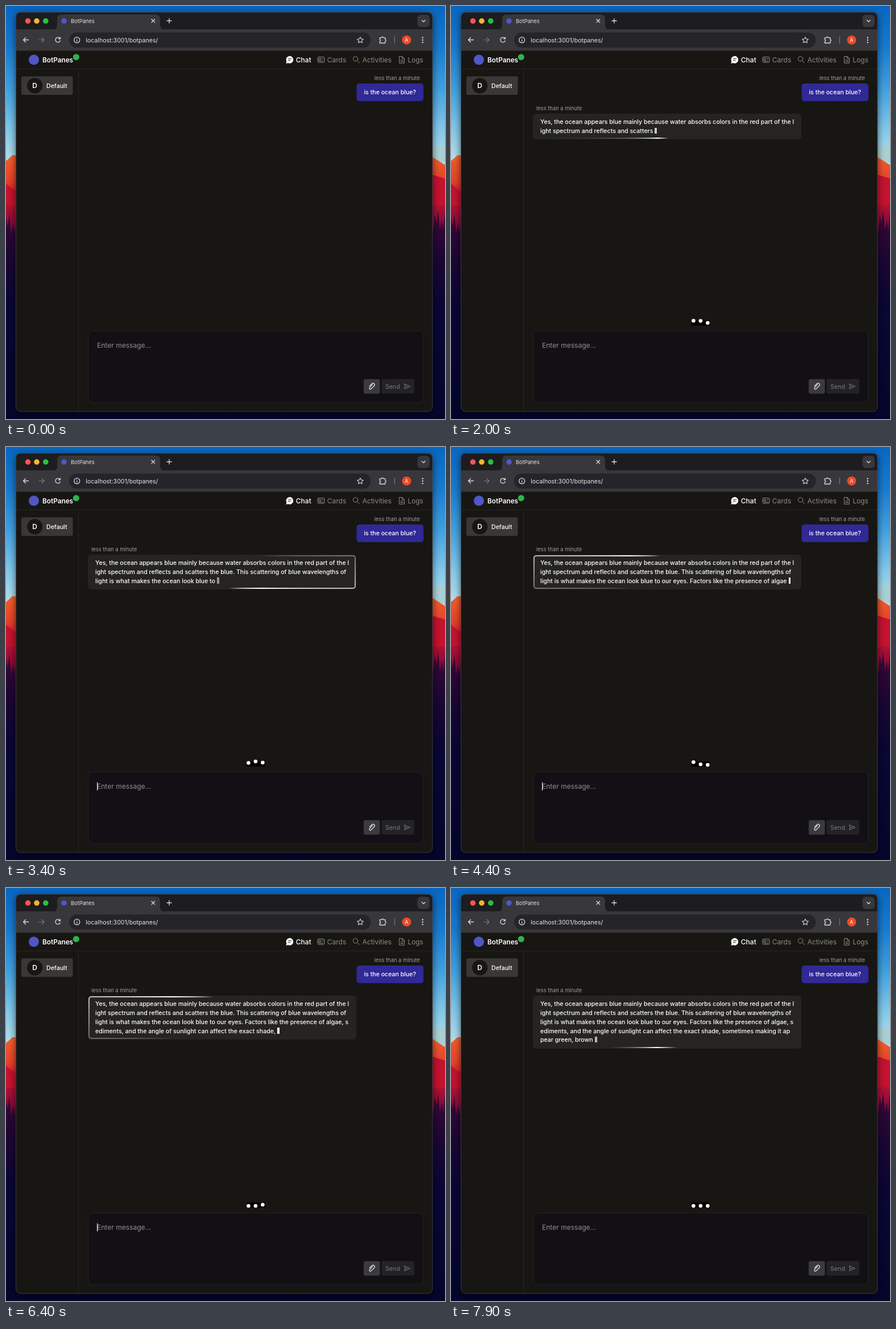
Animation, 772 px wide and 725 px high, one loop 8000 ms. Source, as an HTML page:

```html
<!DOCTYPE html>
<html lang="en">
<head>
<meta charset="utf-8">
<title>Chat stream</title>
<style>
  html, body { margin: 0; width: 100%; height: 100%; overflow: hidden; background: #04062c; }
  body { position: relative; font-family: Inter, "Open Sans", sans-serif; }
  svg { position: absolute; left: 0; top: 0; display: block; }
  svg text { font-family: Inter, "Open Sans", sans-serif; white-space: pre; }
  .line { fill: none; stroke-linecap: round; stroke-linejoin: round; }
  #bubble {
    position: absolute; left: 144px; top: 189px; box-sizing: border-box;
    border-radius: 6px; padding: 7.4px 13px 6.6px; background: #252422;
    color: #fff; font-size: 10.59px; font-weight: 500; line-height: 15.75px; white-space: pre;
  }
  /* Ring lit by a rotating wedge of light */
  #bubble::before {
    content: ""; position: absolute; inset: 1px; border: 2px solid transparent; border-radius: 5px;
    background:
      linear-gradient(#252422, #252422) padding-box,
      conic-gradient(from var(--from), transparent 0deg, #fff 45deg, transparent 90deg) border-box;
  }
  #bubble div { position: relative; height: 15.75px; }
  #block {
    display: inline-block; width: 3.8px; height: 10.5px; margin-left: 3px;
    background: #fff; vertical-align: -1px; line-height: 0;
  }
</style>
</head>
<body>
<svg width="772" height="725" viewBox="0 0 772 725">
  <defs>
    <linearGradient id="sky" x2="0" y2="1">
      <stop offset="0" stop-color="#0866c0"/>
      <stop offset=".1" stop-color="#187ace"/>
      <stop offset=".2" stop-color="#419fde"/>
      <stop offset=".3" stop-color="#84c8e8"/>
      <stop offset=".37" stop-color="#b0dcea"/>
    </linearGradient>
    <linearGradient id="hills" gradientUnits="userSpaceOnUse" x1="0" y1="262" x2="0" y2="725">
      <stop offset="0" stop-color="#f0602c"/>
      <stop offset=".1" stop-color="#e4402a"/>
      <stop offset=".15" stop-color="#c8142f"/>
      <stop offset=".25" stop-color="#8e0c38"/>
      <stop offset=".36" stop-color="#4a0a3c"/>
      <stop offset=".5" stop-color="#0b0738"/>
      <stop offset="1" stop-color="#04062c"/>
    </linearGradient>
    <linearGradient id="forest" x2="0" y2="1">
      <stop offset="0" stop-color="#3a0836"/>
      <stop offset=".5" stop-color="#1a0634"/>
      <stop offset="1" stop-color="#070634"/>
    </linearGradient>
    <filter id="soft" x="-5%" y="-5%" width="110%" height="110%"><feGaussianBlur stdDeviation="6"/></filter>
    <clipPath id="frame"><rect x="17.5" y="11" width="732.5" height="701" rx="8"/></clipPath>
  </defs>

  <!-- wallpaper -->
  <rect width="772" height="725" fill="url(#sky)"/>
  <rect x="745" y="244" width="27" height="30" fill="#a9cfd2"/>
  <path d="M0 272L6 267L11 262H17L24 270H745L750 265L772 279V725H0Z" fill="url(#hills)"/>
  <path d="M0 312L17 326V350H0ZM750 296L772 303V350H750Z" fill="#c4122f"/>
  <path id="trees" fill="url(#forest)"/>
  <rect x="16" y="13" width="735.5" height="704" rx="10" fill="#000" opacity=".5" filter="url(#soft)"/>

  <!-- browser window -->
  <g clip-path="url(#frame)">
    <rect x="17" y="11" width="734" height="702" fill="#181613"/>
    <rect x="17" y="11" width="734" height="31" fill="#1d1c1f"/>
    <rect x="17" y="41" width="734" height="37" fill="#38373b"/>
    <path d="M82 41.5Q90 41.5 90 33.500V23Q90 15 98 15H263Q271 15 271 23V33.500Q271 41.5 279 41.5Z" fill="#38373b"/>
    <path d="M17 78.500H751M17 110.500H751M127.500 110V713" stroke="#282622" fill="none"/>
  </g>
  <rect x="17.500" y="11" width="732.500" height="701" rx="8" fill="none" stroke="#55545a" opacity=".6"/>
  <circle cx="38.500" cy="26.300" r="4.800" fill="#f4574e"/>
  <circle cx="54" cy="26.300" r="4.800" fill="#f6b42f"/>
  <circle cx="69.800" cy="26.300" r="4.800" fill="#28c03f"/>
  <circle cx="102" cy="26.300" r="4.800" fill="#4f57c6"/>
  <rect x="723.500" y="15.500" width="21.500" height="21.500" rx="6" fill="#38373b"/>
  <rect x="111" y="46.500" width="530.500" height="26.500" rx="13.200" fill="#252428"/>
  <g class="line" stroke="#dddce0" stroke-width="1.300">
    <path d="M256 23.300l5.600 5.600m0-5.600l-5.600 5.600M283 26h8m-4-4v8M731.500 25l2.800 2.800 2.800-2.800"/>
    <path d="M39.500 59.500h-9m4-4l-4 4 4 4M95 57.300a4.300 4.300 0 1 0 .3 3.500M95.400 54.800v2.900h-2.900"/>
    <circle cx="124.700" cy="59.700" r="5"/><path d="M124.700 59.500v2.500m0-4.700v.1"/>
    <path d="M623 54.500l1.600 3.300 3.700.5-2.700 2.500.7 3.600-3.300-1.700-3.300 1.700.7-3.600-2.700-2.500 3.700-.5z" stroke-width="1.100"/>
    <path d="M657.300 55.700h3.200a1.500 1.500 0 0 1 3 0h3.300v3.100a1.500 1.500 0 0 1 0 3v3.200h-9.500v-3.100a1.500 1.500 0 0 0 0-3z"/>
  </g>
  <path d="M58 59.500h9m-4-4l4 4-4 4M683.500 54v11" class="line" stroke="#78777b" stroke-width="1.200"/>
  <circle cx="704.500" cy="59.700" r="8" fill="#ec4a2a"/>
  <g fill="#e4e4e6"><circle cx="732.700" cy="55.500" r="1.200"/><circle cx="732.700" cy="59.700" r="1.200"/><circle cx="732.700" cy="63.900" r="1.200"/></g>

  <!-- app header -->
  <circle cx="49" cy="94.300" r="9" fill="#4f57c6"/>
  <circle cx="123.300" cy="89.700" r="5.500" fill="#2bb64c"/>
  <path d="M492.500 101l.8-3.600a6.400 6.400 0 1 1 2.700 2.600z" fill="#fff"/>
  <path d="M496.500 92.700h5.200m-5.200 3h3.500" class="line" stroke="#181613" stroke-width="1.100"/>
  <g class="line" stroke="#8d8c8a">
    <rect x="548" y="89.500" width="12" height="9.500" rx="1.800"/>
    <path d="M550.300 92h3v3h-3zM555.500 92.500h2.500m-7.700 4.300h7.700"/>
    <circle cx="614.700" cy="92.700" r="4.100"/><path d="M617.700 95.800l3.600 3.800"/>
    <path d="M692 88.500h4.800l3.700 3.700v8h-8.500zM696.700 88.700v3.500h3.500M694 95h4.500m-4.500 2.500h4.500"/>
  </g>

  <!-- sidebar, messages, composer -->
  <rect x="27.500" y="124" width="89.500" height="31.500" rx="2" fill="#393835" stroke="#45443f" stroke-width=".6"/>
  <circle cx="50.700" cy="139.800" r="13.600" fill="#171614"/>
  <rect x="616.500" y="136" width="117.700" height="31" rx="5" fill="#302996"/>
  <rect x="144.500" y="570.500" width="589" height="125.500" rx="8" fill="#121014" stroke="#232126"/>
  <rect x="629" y="655" width="28.500" height="25.500" rx="3" fill="#3b3a3d"/>
  <rect x="660.500" y="655" width="57.500" height="25.500" rx="3" fill="#232224"/>
  <path d="M639.300 667.200l4.200-4.200a2.700 2.700 0 0 1 3.900 3.900l-5.300 5.300a1.800 1.800 0 0 1-2.600-2.600l4.900-4.900" class="line" stroke="#f2f2f2" stroke-width="1.200"/>
  <path d="M700.500 663.500l10.300 4.300-10.300 4.300 1.500-4.300zM702 667.800h4" class="line" stroke="#7a797c"/>
  <g id="labels"></g>
  <rect id="caret" x="160" y="588.500" width="1.200" height="14.500" fill="#e8e8e8"/>
  <g id="dots">
    <rect x="423" y="552" width="32.500" height="9" fill="#000"/>
    <circle cx="426.400" r="3.300" fill="#fff"/>
    <circle cx="438.900" r="3.300" fill="#fff"/>
    <circle cx="451.400" r="3.300" fill="#fff"/>
  </g>
</svg>
<div id="bubble"></div>

<script>
const LOOP = 8000, STEP = 100;
const DOTS_AT = 200, REPLY_AT = 500;
const $ = id => document.getElementById(id);

function label(x, y, text, size, fill, weight = 400, anchor = 'start') {
  const node = document.createElementNS('http://www.w3.org/2000/svg', 'text');
  const attrs = { x, y, fill, 'font-size': size, 'font-weight': weight, 'text-anchor': anchor };
  for (const key in attrs) node.setAttribute(key, attrs[key]);
  node.textContent = text;
  $('labels').append(node);
  return node;
}

label(114, 29.6, 'BotPanes', 9.3, '#e4e3e6');
label(140.3, 63.5, 'localhost:3001/botpanes/', 10.6, '#e6e5e8');
label(704.5, 62.8, 'A', 8.5, '#fff', 400, 'middle');
label(64, 98.7, 'BotPanes', 11.8, '#fff', 600);
label(509.8, 98.7, 'Chat', 12, '#fff', 500);
label(564.8, 98.7, 'Cards', 12, '#8d8c8a');
label(626.7, 98.7, 'Activities', 11.9, '#8d8c8a');
label(706.6, 98.7, 'Logs', 11.8, '#8d8c8a');
label(50.7, 144.2, 'D', 12, '#fff', 600, 'middle');
label(71, 143.6, 'Default', 10.6, '#fff', 500);
label(728, 130, 'less than a minute', 9.4, '#a09f9d', 400, 'end');
label(675.3, 154.7, 'is the ocean blue?', 10.6, '#fff', 500, 'middle');
label(160, 600, 'Enter message...', 12.05, '#8f8e92');
label(667, 671.5, 'Send', 10.7, '#7a797c');
const replyTime = label(150, 183.4, 'less than a minute', 9.4, '#a09f9d');

// Jagged tree line along both window edges
const treeLine = (x0, x1, top) => {
  let d = `M${x0} 540`;
  for (let x = x0, i = 0; x <= x1; x += 3, i++) d += `L${x} ${top + (i % 2) * 24 + 9 * Math.sin(x * 1.7)}`;
  return d + `L${x1} 540Z`;
};
$('trees').setAttribute('d', treeLine(0, 18, 372) + treeLine(748, 772, 366));

// Reply text with its mid-word wraps
const lines = [
  'Yes, the ocean appears blue mainly because water absorbs colors in the red part of the l',
  'ight spectrum and reflects and scatters the blue. This scattering of blue wavelengths of ',
  'light is what makes the ocean look blue to our eyes. Factors like the presence of algae, s',
  'ediments, and the angle of sunlight can affect the exact shade, sometimes making it ap',
  'pear green, brown'
];
const reply = lines.join('');
const tokenEnds = [...reply.matchAll(/\w+|[.,]/g)].map(m => m.index + m[0].length);
const progress = [
  [REPLY_AT, 'Yes'], [2000, 'scatters'], [3400, 'look blue to'], [4400, 'algae'],
  [5600, 'affect the'], [6400, 'shade,'], [7900, 'brown']
].map(([time, words]) => [time, reply.indexOf(words) + words.length]);

function typedLength(t) {
  const next = Math.max(1, progress.findIndex(p => p[0] >= t));
  const [t0, n0] = progress[next - 1], [t1, n1] = progress[next];
  const count = n0 + (n1 - n0) * (t - t0) / (t1 - t0) + 0.01;
  return tokenEnds.filter(end => end <= count).pop();
}

function paintBubble(t) {
  const shown = t >= REPLY_AT;
  const bubble = $('bubble');
  bubble.style.display = shown ? 'block' : 'none';
  replyTime.style.display = shown ? '' : 'none';
  if (!shown) return;

  let left = typedLength(t);
  const visible = [];
  for (const line of lines) {
    if (left <= 0) break;
    visible.push(line.slice(0, left));
    left -= line.length;
  }
  bubble.replaceChildren(...visible.map(text => {
    const row = document.createElement('div');
    row.textContent = text;
    return row;
  }));
  const block = document.createElement('span');
  block.id = 'block';
  block.style.opacity = 0.75 + 0.25 * Math.cos(Math.PI * (t - 4500) / 1000);
  bubble.lastChild.append(block);

  bubble.style.width = visible.length > 1 ? '472px' : 'auto';
  bubble.style.maxWidth = '472px';
  bubble.style.setProperty('--from', `${(0.18 * t - 185) % 360}deg`);
}

function paintDots(t) {
  $('dots').style.display = t >= DOTS_AT ? '' : 'none';
  const period = 1300, rise = 400;
  $('dots').querySelectorAll('circle').forEach((dot, i) => {
    const phase = (t - 620 - 170 * i + 10.5 * period) % period - period / 2;
    const lift = Math.abs(phase) < rise ? 3 * (1 + Math.cos(Math.PI * phase / rise)) : 0;
    dot.setAttribute('cy', 558 - lift);
  });
}

function paint(t) {
  paintBubble(t);
  paintDots(t);
  const blink = t % 1000;
  $('caret').style.display = blink >= 200 && blink < 700 ? '' : 'none';
}

const start = performance.now();
let last = -1;
function tick() {
  const t = Math.floor((performance.now() - start) % LOOP / STEP) * STEP;
  if (t !== last) paint(last = t);
  requestAnimationFrame(tick);
}
tick();
</script>
</body>
</html>
```
